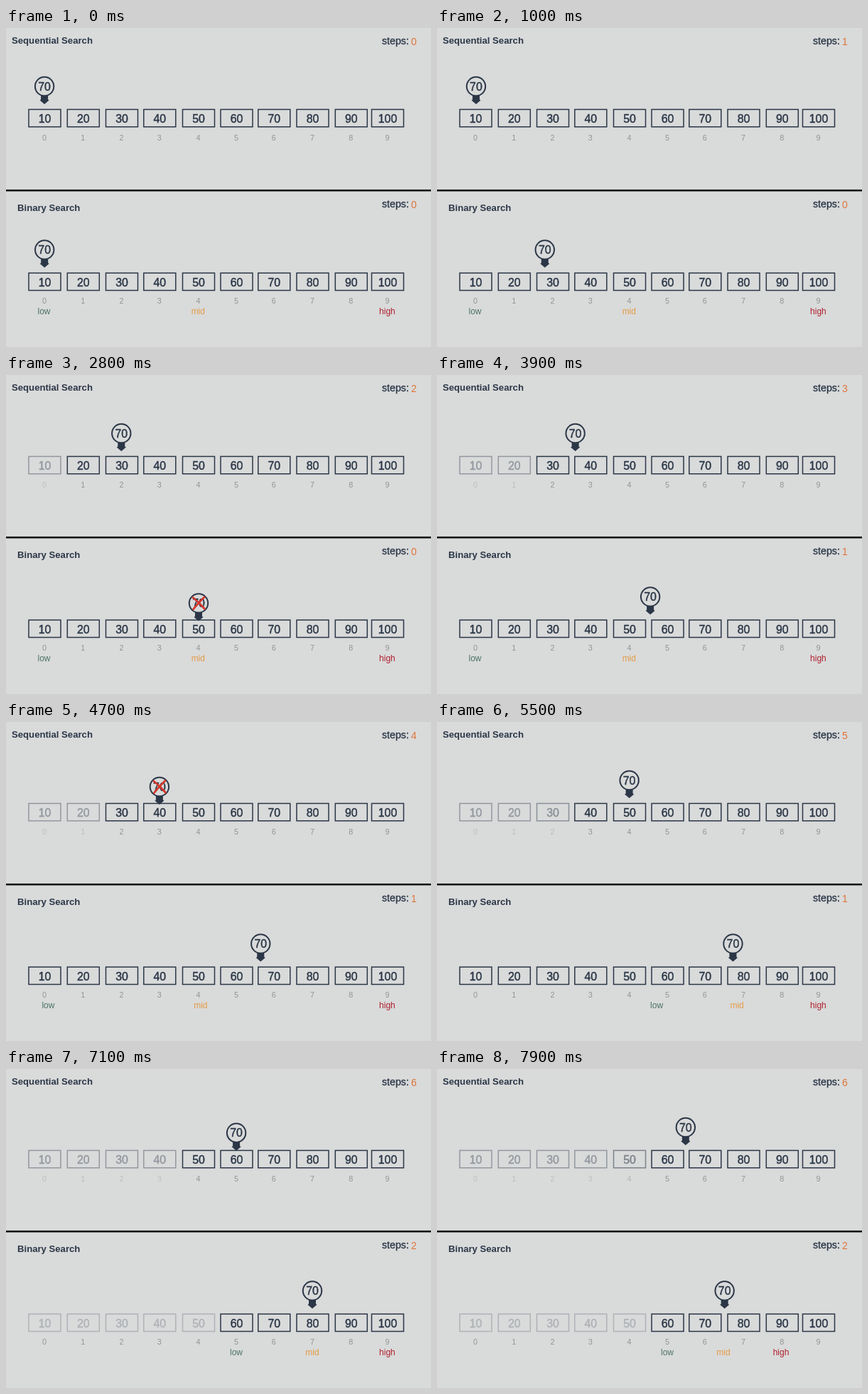
These frames come from a looping animation (598x448 px, 8000 ms). An HTML page:

```html
<!DOCTYPE html>
<html lang="en">
<head>
<meta charset="utf-8">
<title>Sequential and binary search</title>
<style>
  html, body { margin: 0; width: 100%; height: 100%; overflow: hidden; background: #d9dada; }
  svg { display: block; width: 100vw; height: 100vh; }
  text { font-family: "Liberation Sans", Arial, sans-serif; fill: #2b3747; }
  .title { font-size: 13.15px; font-weight: bold; }
  .steps { font-size: 14.2px; stroke: #2b3747; stroke-width: .3px; }
  .count { font-size: 14px; fill: #df7538; text-anchor: middle; }
  .num { font-size: 15.9px; text-anchor: middle; stroke: #2b3747; stroke-width: .45px; }
  .index { font-size: 10.8px; fill: #939495; text-anchor: middle; }
  .label { font-size: 12px; text-anchor: middle; }
  .box { fill: none; stroke: #2b3747; stroke-width: 1.5; }
  .ring { fill: #d9dada; stroke: #2b3747; stroke-width: 2; }
  .tip { fill: #2b3747; }
  .cross { fill: none; stroke: #d5362c; stroke-width: 2.8; stroke-linecap: round; }
</style>
</head>
<body>
<svg id="stage" viewBox="0 0 598 448"></svg>
<script>
const LOOP = 8000, TICK = 100;
const CENTERS = [54.5, 108.8, 163, 216.3, 271, 324.5, 377.3, 431.5, 485.8, 537];
const stage = document.getElementById("stage");

function add(parent, tag, attrs, text) {
  const el = document.createElementNS("http://www.w3.org/2000/svg", tag);
  for (const key in attrs) el.setAttribute(key, attrs[key]);
  if (text !== undefined) el.textContent = text;
  return parent.appendChild(el);
}

const write = (parent, cls, x, y, text) => add(parent, "text", { class: cls, x, y }, text);
const linear = (t, start, end) => Math.min(1, Math.max(0, (t - start) / (end - start)));
const ease = (t, start, end) => (1 - Math.cos(Math.PI * linear(t, start, end))) / 2;
const mix = (a, b, p) => a + (b - a) * p;
const place = (el, x, y) => el.setAttribute("transform", `translate(${x} ${y})`);

// One half of the stage: array cells, step counter and the search pointer.
function makePanel(title, titleX, titleY, top, stepsY) {
  write(stage, "title", titleX, titleY, title);
  write(stage, "steps", 529, stepsY, "steps:");
  const count = write(stage, "count", 573.8, stepsY + 1, "0");
  const cells = CENTERS.map((x, i) => {
    const cell = add(stage, "g", {});
    add(cell, "rect", { class: "box", x: x - 22.5, y: top, width: 45, height: 24.4 });
    write(cell, "num", x, top + 18.4, (i + 1) * 10);
    return cell;
  });
  const indices = CENTERS.map((x, i) => write(stage, "index", x - .6, top + 43.2, i));
  const pointer = add(stage, "g", {});
  add(pointer, "path", { class: "tip", d: "M-5 11H5V18.5L6.5 19.5L0 25L-6.5 19.5L-5 18.5Z" });
  add(pointer, "circle", { class: "ring", r: 13.2 });
  write(pointer, "num", 0, 5.8, "70");
  const cross = add(pointer, "path", { class: "cross", d: "M-8 -8Q1 -1 8.5 8M8 -8.5Q-1 0 -7.5 8.5" });
  return { count, cells, indices, pointer, cross };
}

add(stage, "rect", { x: 0, y: 226.9, width: 598, height: 2.5, fill: "#050505" });
const seq = makePanel("Sequential Search", 8, 21.6, 114.4, 22.8);
const bin = makePanel("Binary Search", 16, 256.7, 344.1, 252.2);

function makeLabel(text, color) {
  const label = write(stage, "label", 0, 0, text);
  label.style.fill = color;
  return label;
}
const low = makeLabel("low", "#4c7463");
const mid = makeLabel("mid", "#e39b45");
const high = makeLabel("high", "#b0202e");

// Times in ms for each visited cell of the sequential search.
const VISITS = [
  { count: 400, dip: 450, move: 950, fade: 1150 },
  { count: 1900, dip: 1800, move: 2210, fade: 3000 },
  { count: 3000, dip: 3000, move: 3550, fade: 4900 },
  { count: 4250, dip: 4250, move: 4850, fade: 5700 },
  { count: 5400, dip: 5500, move: 6120, fade: 7400 },
  { count: 6900, dip: 6950, move: 7595, fade: LOOP }
];
const MOVE = 620, FADE = 650;

const dipDepth = (t, start, end) => ease(t, start, start + 200) - ease(t, end - 150, end);

function showPointer(panel, x, y, depth) {
  place(panel.pointer, x, y + 9 * depth);
  panel.cross.style.display = depth > .95 ? "" : "none";
}

function drawSequential(t) {
  let x = CENTERS[0] - .4, depth = 0, steps = 0;
  VISITS.forEach((visit, i) => {
    x += (CENTERS[i + 1] - CENTERS[i]) * ease(t, visit.move, visit.move + MOVE);
    depth += dipDepth(t, visit.dip, visit.move);
    if (t >= visit.count) steps++;
    const opacity = mix(1, .4, linear(t, visit.fade, visit.fade + FADE));
    seq.cells[i].style.opacity = seq.indices[i].style.opacity = opacity;
  });
  seq.count.textContent = steps;
  showPointer(seq, x, 82, depth);
}

function drawBinary(t) {
  const x = 54.2 + 216.8 * linear(t, 100, 2100)
    + 160 * linear(t, 3500, 5700) - 54 * linear(t, 7500, 8320);
  showPointer(bin, x, 311.5, dipDepth(t, 2400, 3300) + dipDepth(t, 5900, 6750));
  bin.count.textContent = t >= 6200 ? 2 : t >= 2950 ? 1 : 0;

  const fade = mix(1, .24, linear(t, 5700, 6250));
  bin.cells.slice(0, 5).forEach(cell => { cell.style.opacity = fade; });

  const shift = ease(t, 4600, 5660);
  place(low, mix(53.5, 324, shift), 402.3);
  place(mid, mix(270.3, 431, shift) - 54 * ease(t, 7500, 8280), 402.3);
  place(high, mix(536.4, 484, ease(t, 7100, 7800)), 401.5);
}

function draw(now) {
  const t = Math.floor((now % LOOP) / TICK) * TICK;
  drawSequential(t);
  drawBinary(t);
}

const begin = performance.now();
function frame() {
  draw(performance.now() - begin);
  requestAnimationFrame(frame);
}
frame();
</script>
</body>
</html>
```
